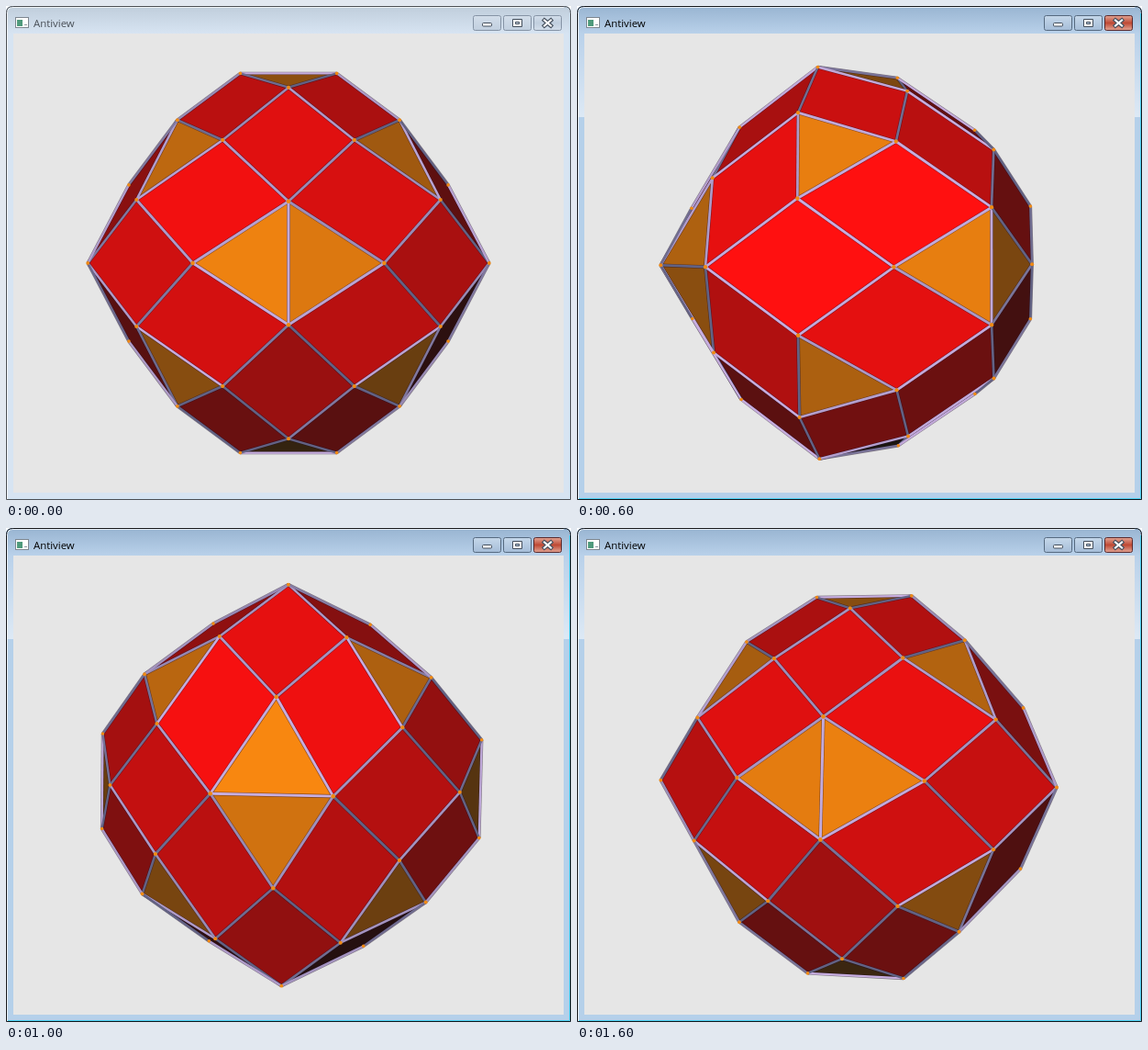
An HTML page with a canvas for the animation above (1800 ms loop, 616 by 538 pixels).

```html
<!DOCTYPE html>
<html lang="en">
<head>
<meta charset="utf-8">
<title>Antiview</title>
<style>
html, body { margin: 0; width: 100%; height: 100%; overflow: hidden; background: #fff; }
#win {
  --rim: #16181c; --top: #98b4d1; --bar: #b9d1ea; --glow: #dde9f5; --side: #b5d0ea;
  --cyan: #45cdee; --ink: #000; --line: #566a80; --b1: #c6d8ea; --b2: #a5bdd8;
  --x1: #e2a595; --x2: #bf4a35; --xl: #5a2a2c;
  position: relative; width: 616px; height: 538px; overflow: hidden;
}
#win.idle {
  --rim: #4c4f54; --top: #bfcddb; --bar: #d7e4f2; --glow: #d7e4f2; --side: #d7e4f2;
  --cyan: #cfe3f2; --ink: #4a5058; --line: #8593a5; --b1: #d3deea; --b2: #c1cfdf;
  --x1: #d3deea; --x2: #c1cfdf; --xl: #8593a5;
}
svg, canvas { position: absolute; left: 0; top: 0; }
text { font: 11.4px "Open Sans", "Noto Sans", sans-serif; fill: var(--ink); }
.btn { fill: url(#btn); stroke: var(--line); }
.close { fill: url(#close); stroke: var(--xl); }
.glyph { fill: #fff; stroke: #434e5c; }
</style>
</head>
<body>
<div id="win" class="idle">
<svg width="616" height="538" viewBox="0 0 616 538">
  <defs>
    <linearGradient id="title" x2="0" y2="1">
      <stop offset="0" stop-color="var(--top)"/><stop offset="1" stop-color="var(--bar)"/>
    </linearGradient>
    <linearGradient id="edge" x2="0" y2="1">
      <stop offset="0" stop-color="var(--bar)"/><stop offset="1" stop-color="var(--glow)"/>
    </linearGradient>
    <linearGradient id="btn" x2="0" y2="1">
      <stop offset="0" stop-color="var(--b1)"/><stop offset="1" stop-color="var(--b2)"/>
    </linearGradient>
    <linearGradient id="close" x2="0" y2="1">
      <stop offset="0" stop-color="var(--x1)"/><stop offset=".5" stop-color="var(--x2)"/>
      <stop offset="1" stop-color="var(--x1)"/>
    </linearGradient>
    <clipPath id="shape"><path d="M0 538V7Q0 0 7 0H609Q616 0 616 7V538Z"/></clipPath>
  </defs>
  <g clip-path="url(#shape)">
    <rect width="616" height="538" fill="var(--side)"/>
    <rect y="30" width="616" height="91" fill="url(#edge)"/>
    <rect width="616" height="30" fill="url(#title)"/>
    <path d="M1.5 537V7.5Q1.5 1.5 7.5 1.5H608" fill="none" stroke="#fff" stroke-opacity=".75"/>
    <path d="M614.5 8V536.5H2" fill="none" stroke="var(--cyan)"/>
    <rect x="8" y="30" width="600" height="500" fill="#e6e6e6"/>
  </g>
  <path d="M.5 537.5V7.5Q.5 .5 7.5 .5H608.5Q615.5 .5 615.5 7.5V537.5Z" fill="none" stroke="var(--rim)"/>
  <rect x="10.5" y="12.5" width="14" height="11" fill="#fff" stroke="#7d868f"/>
  <rect x="12" y="15" width="6" height="7" fill="#4f9a7c"/>
  <path d="M20 20.500h3" stroke="#8c96a0"/>
  <text x="30" y="23">Antiview</text>
  <rect class="btn" x="509.500" y="10.500" width="30" height="16" rx="2"/>
  <rect class="btn" x="542.500" y="10.500" width="30" height="16" rx="2"/>
  <rect class="close" x="575.500" y="10.500" width="30" height="16" rx="2"/>
  <rect class="glyph" x="519.500" y="18.500" width="10" height="3.500" rx="1"/>
  <path class="glyph" fill-rule="evenodd" d="M552.500 14.500h10v8h-10zM555.500 17.500h4v2h-4z"/>
  <path d="M587 15.500l7 6m0-6l-7 6" stroke="#434e5c" stroke-width="4.400" stroke-linecap="square"/>
  <path d="M587 15.500l7 6m0-6l-7 6" stroke="#fff" stroke-width="2.200" stroke-linecap="square"/>
</svg>
<canvas id="view" width="616" height="538"></canvas>
</div>
<script>
const win = document.getElementById("win");
const ctx = document.getElementById("view").getContext("2d");
const CX = 308, CY = 280, EYE = 945, SIZE = 105.2, STEP = 200;

// yaw, pitch, roll in degrees for each step of the drag
const POSES = [
  [0, 0, 0], [8.9, 0, 0], [20, -0.5, 0.1],
  [34.9, -1.06, 0.2], [60, -1.8, -0.3], [86, -2.4, -1],
  [114.5, -1.2, -1.9], [143.1, 0.3, -2.56], [171, 1.5, -1.3]
];

const add = (u, v) => u.map((x, i) => x + v[i]);
const sub = (u, v) => u.map((x, i) => x - v[i]);
const dot = (u, v) => u[0] * v[0] + u[1] * v[1] + u[2] * v[2];
const unit = u => u.map(x => x / Math.sqrt(dot(u, u)));
const cross = (u, v) => [u[1] * v[2] - u[2] * v[1], u[2] * v[0] - u[0] * v[2], u[0] * v[1] - u[1] * v[0]];
const center = pts => pts.reduce(add).map(x => x / pts.length);
const key = p => p.map(x => Math.round(x * 50)).join();

// Unit icosahedron swept along the four diagonals of a cube
function buildFaces() {
  const a = 0.5, b = a * (1 + Math.sqrt(5)) / 2, c = 1 / Math.sqrt(3);
  const p = a + c, q = b + c, hi = b + 2 * c, lo = a + 2 * c;
  const A = [0, a, hi], B = [b, 0, lo], C = [c, p, q];
  const seeds = [
    [A, [0, -a, hi], B],
    [C, [p, q, c], [q, c, p]],
    [A, C, [0, lo, b], [-c, p, q]],
    [A, C, [q, c, p], B]
  ];
  const faces = new Map();
  for (const seed of seeds)
    for (let turn = 0; turn < 3; turn++)
      for (let s = 0; s < 8; s++) {
        const pts = seed.map(v => [0, 1, 2].map(i =>
          v[(i + turn) % 3] * (s >> i & 1 ? -1 : 1) * SIZE));
        faces.set(key(center(pts)), pts);
      }
  return [...faces.values()];
}

const faces = buildFaces();
const SHADE = [-27, 50, 245], LIGHT = unit(SHADE);

function turner(pose) {
  const [y, p, r] = pose.map(d => d * Math.PI / 180);
  const spin = (u, v, t) => [u * Math.cos(t) + v * Math.sin(t), v * Math.cos(t) - u * Math.sin(t)];
  return ([X, Y, Z]) => {
    [X, Z] = spin(X, Z, y);
    [Y, Z] = spin(Y, Z, p);
    [Y, X] = spin(Y, X, r);
    return [X, Y, Z];
  };
}

const scale = v => EYE / (EYE - v[2]);
const project = v => [CX + v[0] * scale(v), CY - v[1] * scale(v)];

function faceColor(n, sides) {
  const level = 15 + dot(n, SHADE);
  const r = Math.max(22, Math.min(255, sides === 3 ? level * 0.94 : level));
  return `rgb(${r},${sides === 3 ? 8 + r * 0.51 : 16},16)`;
}

function edgeColor(u, v) {
  const along = dot(unit(sub(v, u)), LIGHT);
  const t = Math.max(0, (Math.sqrt(1 - along * along) - 0.7) / 0.3);
  const mix = (lo, hi) => lo + (hi - lo) * t;
  return `rgb(${mix(98, 200)},${mix(98, 174)},${mix(132, 224)})`;
}

function trace(pts) {
  ctx.beginPath();
  pts.forEach(v => ctx.lineTo(...project(v)));
}

function draw(pose) {
  const turn = turner(pose), edges = new Map(), dots = new Map();
  ctx.clearRect(0, 0, 616, 538);
  for (const face of faces) {
    const pts = face.map(turn), mid = center(pts);
    let n = unit(cross(sub(pts[1], pts[0]), sub(pts[2], pts[0])));
    if (dot(n, mid) < 0) n = n.map(x => -x);
    if (dot(n, sub([0, 0, EYE], mid)) <= 0) continue;
    trace(pts);
    ctx.fillStyle = faceColor(n, pts.length);
    ctx.fill();
    pts.forEach((v, i) => {
      const w = pts[(i + 1) % pts.length];
      edges.set(key(center([v, w])), [v, w]);
      dots.set(key(v), v);
    });
  }
  const stroke = (extra, color) => {
    for (const [v, w] of edges.values()) {
      trace([v, w]);
      ctx.lineWidth = 2.3 * scale(center([v, w])) + extra;
      ctx.strokeStyle = color || edgeColor(v, w);
      ctx.stroke();
    }
  };
  stroke(1.1, "rgba(28,12,34,.5)");
  stroke(0);
  ctx.fillStyle = "#f08a14";
  for (const v of dots.values()) {
    ctx.beginPath();
    ctx.arc(...project(v), 1.8 * scale(v), 0, 7);
    ctx.fill();
  }
}

const start = performance.now();
let shown = -1;
function tick() {
  const i = Math.floor((performance.now() - start) / STEP) % POSES.length;
  if (i !== shown) {
    shown = i;
    win.classList.toggle("idle", i === 0);
    draw(POSES[i]);
  }
  requestAnimationFrame(tick);
}
tick();
</script>
</body>
</html>
```
